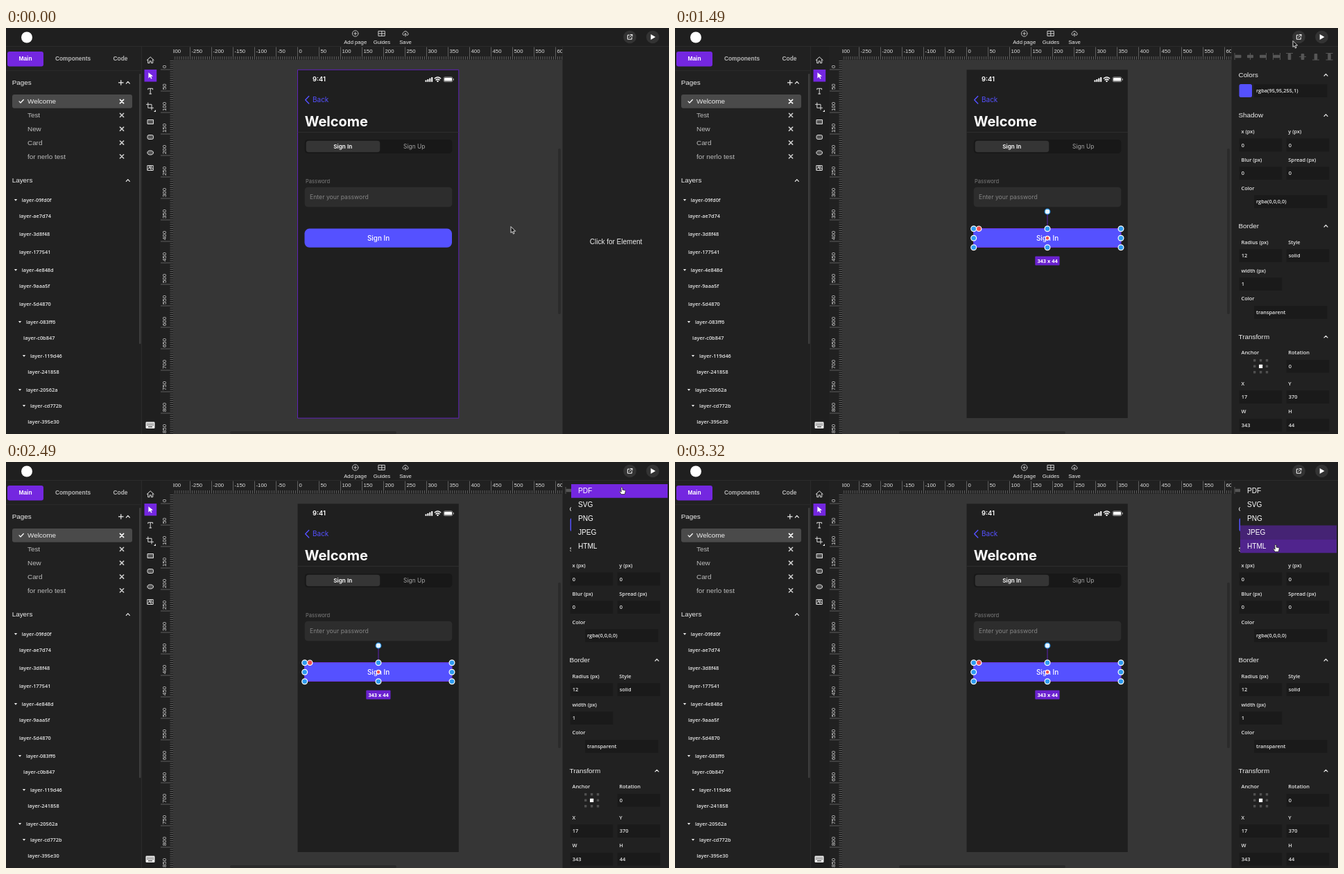
Animation of 956x586 px, one loop 3.35 s. Source, as an HTML page with a canvas:

```html
<!DOCTYPE html>
<html lang="en">
<head>
<meta charset="utf-8">
<title>Design editor</title>
<style>
html, body { margin: 0; width: 956px; height: 586px; overflow: hidden; background: #212121; }
canvas { display: block; }
</style>
</head>
<body>
<canvas id="stage" width="956" height="586"></canvas>
<script>
const c = document.getElementById('stage').getContext('2d');
const LOOP = 3350, SELECT_AT = 600, HAND_AT = 1610, MENU_AT = 1820;
const ARIAL = '"Liberation Sans", Arial, sans-serif';
const OPEN = '"Open Sans", "Noto Sans", sans-serif';
const INTER = 'Inter, sans-serif';
const PURPLE = '#7427e0', INDIGO = '#5551ff', PANEL = '#212121';

function box(x, y, w, h, fill, r = 0, stroke) {
  c.beginPath();
  c.roundRect(x, y, w, h, r);
  if (fill) { c.fillStyle = fill; c.fill(); }
  if (stroke) { c.strokeStyle = stroke; c.lineWidth = 1; c.stroke(); }
}

// y is the vertical middle of the capitals
function text(s, x, y, { size = 9.9, color = '#eee', weight = 400, font = ARIAL, align = 'left' } = {}) {
  c.font = `${weight} ${size}px ${font}`;
  c.textAlign = align;
  c.fillStyle = color;
  c.fillText(s, x, y + size * 0.36);
}
const small = (s, x, y) => text(s, x, y, { size: 7.4, weight: 600, font: OPEN, color: '#e8e8e8' });

function icon(path, x, y, { stroke = '#ddd', fill, width = 1 } = {}) {
  const shape = new Path2D(path);
  c.save();
  c.translate(x, y);
  c.lineWidth = width;
  c.lineJoin = c.lineCap = 'round';
  if (fill) { c.fillStyle = fill; c.fill(shape); }
  if (stroke) { c.strokeStyle = stroke; c.stroke(shape); }
  c.restore();
}
const solid = (path, x, y, fill = '#e8e8e8') => icon(path, x, y, { fill, stroke: null });

function dot(x, y, r, fill, stroke) {
  c.beginPath();
  c.arc(x, y, r, 0, 7);
  c.fillStyle = fill;
  c.fill();
  if (stroke) { c.strokeStyle = stroke; c.lineWidth = 1.2; c.stroke(); }
}
const chevron = (x, y) => icon('M-2.5 1.3 0-1.3 2.5 1.3', x, y, { stroke: '#eee', width: 1.2 });

function topBar() {
  box(0, 0, 956, 27, '#1f1f1f');
  box(0, 26, 956, 1, '#2b2b2b');
  dot(30, 13.5, 8, '#fff');
  icon('M4.3 0A4.3 4.3 0 1 1-4.3 0 4.3 4.3 0 1 1 4.3 0M-2 0H2M0-2V2', 503.7, 8, { width: 0.8 });
  icon('M-4.5-3.5H4.5V3.5H-4.5ZM0-3.5V3.5M-4.5 0H4.5', 541.8, 8, { width: 0.9 });
  icon('M-2 2.5H-2.7A2.2 2.2 0 0 1-2.8-1.5 3 3 0 0 1 2.8-1.3 2 2 0 0 1 2.7 2.5H2M0 4V0M-1.5 1.3 0-.2 1.5 1.3', 576, 8, { width: 0.9 });
  [['Add page', 503.7], ['Guides', 542], ['Save', 576]].forEach(([s, x]) =>
    text(s, x, 20.3, { size: 7.7, align: 'center' }));
  dot(899.5, 13, 9.3, '#333');
  dot(932.5, 13, 9.3, '#333');
  icon('M-.5-2.8H-3.2V3.2H2.8V.6M1-3.5H3.5V-1M3.3-3.3-.5.5', 899.5, 13, { stroke: '#fff' });
  solid('M-2.8-4 4 0-2.8 4Z', 932.5, 13, '#fff');
}

const pages = ['Welcome', 'Test', 'New', 'Card', 'for nerlo test'];
// name, y, depth, has children
const layers = [
  ['09fd0f', 248, 0, 1], ['ae7d74', 271, 0], ['3d8f48', 297, 0], ['177541', 323, 0],
  ['4e848d', 349, 0, 1], ['9aaa5f', 372, 0], ['5d4870', 398, 0],
  ['083ff6', 424, 1, 1], ['c0b847', 447, 1], ['119d46', 473, 2, 1], ['241858', 496, 2],
  ['20562a', 522, 1, 1], ['cd772b', 545, 2, 1], ['395e30', 568, 2]
];

function leftPanel() {
  box(0, 27, 195, 559, PANEL);
  box(0, 61, 195, 1, '#2a2a2a');
  box(2, 34, 52, 21.5, PURPLE, 3);
  [['Main', 28, '#fff'], ['Components', 96.5, '#b5b5b5'], ['Code', 165, '#b5b5b5']].forEach(([s, x, color]) =>
    text(s, x, 44.3, { size: 8.4, weight: 700, color, align: 'center' }));
  text('Pages', 8.7, 78.5);
  icon('M-3.3 0H3.3M0-3.3V3.3', 165.8, 78.8, { stroke: '#eee', width: 1.2 });
  chevron(175.8, 78.8);
  box(9, 96, 173, 19.7, '#4a4a4a', 3);
  icon('M-3 .2-1 2.3 3.3-2.2', 22, 105.7, { stroke: '#fff', width: 1.2 });
  pages.forEach((name, i) => {
    const y = 105.7 + i * 19.85;
    text(name, 31, y, { color: i ? '#bdbdbd' : '#eee' });
    icon('M-2.6-2.6 2.6 2.6M2.6-2.6-2.6 2.6', 167, y + 0.3, { stroke: i ? '#ccc' : '#fff', width: 1.6 });
  });
  text('Layers', 8.7, 219.8);
  chevron(175.8, 220);
  for (const [name, y, depth, open] of layers) {
    small('layer-' + name, (open ? 22.8 : 19) + depth * 6.1, y);
    if (open) solid('M-2.2-1.2H2.2L0 1.5Z', 14 + depth * 6, y + 0.3);
  }
  box(192, 66, 2.5, 390, '#3d3d3d', 1);
}

function toolBar() {
  box(195, 27, 27, 559, '#1f1f1f');
  box(195, 27, 1, 559, '#2b2b2b');
  box(199.5, 60, 17.7, 17.5, PURPLE);
  icon('M-5 .2 0-4.5 5 .2M-3.5-.5V4.3H-1.2V1.5H1.2V4.3H3.5V-.5', 208.2, 46.3);
  solid('M-2.8-4.2 3.8 1 .8 1.4 2.4 4.3 1 5-.5 2-2.8 4Z', 208.2, 68.5, '#fff');
  icon('M-3.4-2.2V-3.7H3.4V-2.2M0-3.7V4M-1.5 4H1.5', 208.2, 91);
  icon('M-2.7-5V2.3H5M-5-2.7H2.5V5', 207.5, 113);
  solid('M3 0V3H0Z', 213, 118);
  box(204, 132.5, 8.5, 6, '#555', 0, '#ddd');
  box(204, 154.5, 8.5, 6, '#555', 2, '#ddd');
  icon('M4.3 0A4.3 3 0 1 1-4.3 0 4.3 3 0 1 1 4.3 0', 208.2, 180, { fill: '#555' });
  icon('M-4-3.5H4V3.5H-4ZM-4 2-1.3-.5 2 3.5M.5 1 2 0 4 1.6M-2-2H2L0 0Z', 208.2, 202);
  box(201.5, 568.5, 13, 9.5, '#f0f0f0', 1.2);
  for (let i = 0; i < 10; i++) box(203.2 + i % 5 * 2.1, 570.4 + (i / 5 | 0) * 2.2, 1.1, 1.1, '#222');
  box(205, 575.2, 6, 1, '#222');
}

function ruler(vertical) {
  const start = vertical ? 46 : 241, end = vertical ? 586 : 802, origin = vertical ? 60 : 420.5;
  c.save();
  c.beginPath();
  if (vertical) c.rect(222, start, 19, end - start); else c.rect(start, 27, end - start, 19);
  c.clip();
  for (let u = -300; u <= 900; u += 5) {
    const p = origin + u * 0.62, len = u % 50 ? 4.5 : 18;
    if (vertical) box(241 - len, p - 0.35, len, 0.7, '#777');
    else box(p - 0.35, 45.5 - len, 0.7, len, '#777');
    if (u % 50) continue;
    c.save();
    if (vertical) { c.translate(228.3, p - 2); c.rotate(-Math.PI / 2); }
    else c.translate(p + 2, 33.3);
    text(String(u), 0, 0, { size: 7.8, color: '#ddd' });
    c.restore();
  }
  c.restore();
}

function workspace(selected, hovered) {
  box(222, 27, 580, 559, PANEL);
  box(241, 46, 561, 540, '#363636');
  ruler(false);
  ruler(true);
  box(796, 174, 4, 239, '#2b2b2b', 2);
  box(323, 582, 240, 4, '#2b2b2b', 2);

  box(420.5, 60.3, 232.3, 502.8, '#1f1f1f', 0, selected ? null : '#5f22b5');
  const phone = (s, x, y, size, weight = 400, color = '#fff', align = 'left') =>
    text(s, x, y, { size, weight, color, align, font: INTER });
  phone('9:41', 442, 73.7, 9.4, 600);
  for (let i = 0; i < 4; i++) box(604.5 + i * 2.9, 75.3 - i * 1.4, 2, 2.4 + i * 1.4, '#fff', 0.5);
  icon('M-4.2-1.2Q0-4.8 4.2-1.2M-2.4.9Q0-1.3 2.4.9', 622.5, 74, { stroke: '#fff', width: 1.5 });
  dot(622.5, 76.7, 1.2, '#fff');
  box(631, 70.8, 13, 6.8, null, 2, '#888');
  box(632, 71.8, 11, 4.8, '#fff', 1.2);
  box(644.8, 73, 1, 2.5, '#aaa');
  icon('M5-5.2 0 0 5 5.2', 431.7, 103.7, { stroke: INDIGO, width: 1.5 });
  phone('Back', 442, 103.7, 10, 400, INDIGO);
  phone('Welcome', 430.7, 134.5, 20, 700);
  box(420.5, 150, 232.3, 0.8, '#333');
  box(430.7, 161, 212.6, 20, '#181818', 4.5);
  box(432.7, 162.7, 106.6, 16.6, '#353535', 4);
  phone('Sign In', 485.7, 170.8, 8.2, 600, '#fff', 'center');
  phone('Sign Up', 588.7, 170.8, 8.4, 400, '#a8a8a8', 'center');
  phone('Password', 432, 221.5, 7.6, 400, '#7d7d7d');
  box(430.7, 229.7, 212.6, 28.5, '#2d2d2d', 4.5);
  phone('Enter your password', 438, 243.6, 8.7, 400, '#858585');
  box(430.5, 289.6, 212.5, 27.2, INDIGO, 7);
  phone('Sign In', 537, 303.5, 9.9, 500, '#fff', 'center');
  if (hovered) box(430.5, 289.5, 212.5, 27, null, 0, '#6a28c8');
  if (selected) selection();
}

function selection() {
  box(430.5, 289.5, 212.5, 27, null, 0, '#6a35e0');
  box(536.5, 265, 1, 25, '#5f22b5');
  const blue = '#2f9bf0';
  dot(537, 265, 3.8, '#e8f4ff', blue);
  for (const x of [430.7, 537, 643])
    for (const y of [289.7, 303.2, 316.8])
      if (x !== 537 || y !== 303.2) dot(x, y, 3.9, blue, '#fff');
  dot(438.2, 289.7, 3.7, '#ef5050', '#fff');
  dot(537, 303.2, 2.8, '#ef5050', '#fff');
  box(519.3, 329.5, 35.2, 13, '#6b22d0', 1);
  text('343 x 44', 537, 336, { size: 7.4, weight: 700, font: OPEN, color: '#fff', align: 'center' });
}

function field(value, x, y, w = 61.5) {
  box(x, y - 9.5, w, 18.7, '#1a1a1a');
  small(value, x + 3, y);
}
function pair(y, a, b) {
  [[a, 816.5, 813.7], [b, 884.3, 881.7]].forEach(([item, labelX, fieldX]) => {
    if (!item) return;
    small(item[0], labelX, y);
    field(item[1], fieldX, y + 19.7);
  });
}

function rightPanel(selected) {
  box(802, 27, 154, 559, PANEL);
  box(802, 27, 1, 559, '#2b2b2b');
  if (!selected) return text('Click for Element', 879.5, 308.3, { size: 10, align: 'center' });

  const grey = '#565656';
  [812, 829.5, 847.5, 867.5].forEach((x, i) => {
    box(x - 4.5, 38.7, 9, 4.6, grey, 1);
    if (i === 0 || i === 3) box(x - 5.5, 36, 1, 10, grey);
    if (i === 1) box(x - 0.5, 36, 1, 10, grey);
    if (i > 1) box(x + 4.5, 36, 1, 10, grey);
  });
  [886, 905, 924, 943.5].forEach((x, i) => {
    box(x - 2.3, 37, 4.6, 9, grey, 1);
    if (i === 0 || i === 3) box(x - 5, 36, 10, 1, grey);
    if (i === 1) box(x - 5, 41, 10, 1, grey);
    if (i > 1) box(x - 5, 45.5, 10, 1, grey);
  });
  [['Colors', 67.5], ['Shadow', 125.7], ['Border', 285.5], ['Transform', 445.3]].forEach(([s, y]) => {
    text(s, 812.5, y);
    chevron(938.5, y + 0.3);
  });
  box(813.5, 81, 18.5, 19, INDIGO, 2.5);
  field('rgba(95,95,255,1)', 835, 90.7, 105.5);
  pair(149.3, ['x (px)', '0'], ['y (px)', '0']);
  pair(190, ['Blur (px)', '0'], ['Spread (px)', '0']);
  small('Color', 816.5, 231);
  field('rgba(0,0,0,0)', 835, 250.7, 105.5);
  pair(309, ['Radius (px)', '12'], ['Style', 'solid']);
  pair(350, ['width (px)', '1']);
  small('Color', 816.5, 390.7);
  field('transparent', 835, 410.5, 105.5);
  small('Anchor', 816.5, 468.7);
  pair(468.7, null, ['Rotation', '0']);
  for (let i = 0; i < 9; i++) {
    const r = i === 4 ? 2.6 : 1.7;
    box(835.7 + i % 3 * 8.9 - r, 479.8 + (i / 3 | 0) * 8.5 - r, 2 * r, 2 * r, i === 4 ? '#fff' : '#505050', 0.5);
  }
  pair(513, ['X', '17'], ['Y', '370']);
  pair(553.7, ['W', '343'], ['H', '44']);
}

const smooth = p => { p = Math.min(1, Math.max(0, p)); return p * p * (3 - 2 * p); };

const formats = ['PDF', 'SVG', 'PNG', 'JPEG', 'HTML'];
const enterTimes = [1850, 2625, 2755, 2930, 3212, Infinity];

function exportMenu(t) {
  box(815, 30, 139, 107, PANEL);
  formats.forEach((name, i) => {
    const y = 32 + i * 19.85;
    c.globalAlpha = smooth((t - enterTimes[i]) / 200) - smooth((t - enterTimes[i + 1]) / 200);
    box(815, y, 139, 19.85, PURPLE);
    c.globalAlpha = 1;
    text(name, 825, y + 9.8, { size: 10.1, color: '#fff' });
  });
}

// time, x, y of the pointer's hot spot
const route = [
  [0, 728, 287], [80, 724, 288], [400, 566, 305], [660, 560, 304], [990, 791, 150],
  [1490, 891, 19], [1600, 891.5, 12], [1700, 894, 9], [2150, 894, 9], [2490, 888, 36],
  [2625, 883, 52], [2755, 877, 72], [2790, 875, 78], [2930, 871, 92], [3212, 867, 112],
  [3320, 866, 119], [3350, 866, 120]
];

// Monotone cubic through the route
function along(t, k) {
  const slope = i => route[i + 1] && route[i] ? (route[i + 1][k] - route[i][k]) / (route[i + 1][0] - route[i][0]) : 0;
  const tangent = i => { const a = slope(i - 1), b = slope(i); return a * b > 0 ? 2 * a * b / (a + b) : 0; };
  const i = Math.max(0, route.findIndex(p => p[0] > t) - 1);
  const h = route[i + 1][0] - route[i][0], s = (t - route[i][0]) / h, e = smooth(s);
  return route[i][k] * (1 - e) + route[i + 1][k] * e
    + h * s * (1 - s) * ((1 - s) * tangent(i) - s * tangent(i + 1));
}

function pointer(t, x, y) {
  if (t < HAND_AT)
    icon('M0 0V8.6L2 6.8 3.5 10.2 5 9.5 3.5 6.2H6.2Z', x, y, { fill: '#111', stroke: '#eee', width: 0.9 });
  else
    icon('M-1 .8Q0-.6 1 .8V4L4.6 4.8Q5.4 5.2 5.2 6.5L4.2 10.5H-.8L-3.3 6.8Q-3.3 5.2-1 6.8Z', x, y, { fill: '#fff', stroke: '#222', width: 0.8 });
}

function draw(now) {
  const t = now % LOOP, x = along(t, 1), y = along(t, 2);
  const selected = t >= SELECT_AT;
  const hovered = !selected && x < 643 && y > 290;
  workspace(selected, hovered);
  leftPanel();
  toolBar();
  rightPanel(selected);
  topBar();
  if (t >= MENU_AT) exportMenu(t);
  pointer(t, x, y);
  requestAnimationFrame(draw);
}
requestAnimationFrame(draw);
</script>
</body>
</html>
```
